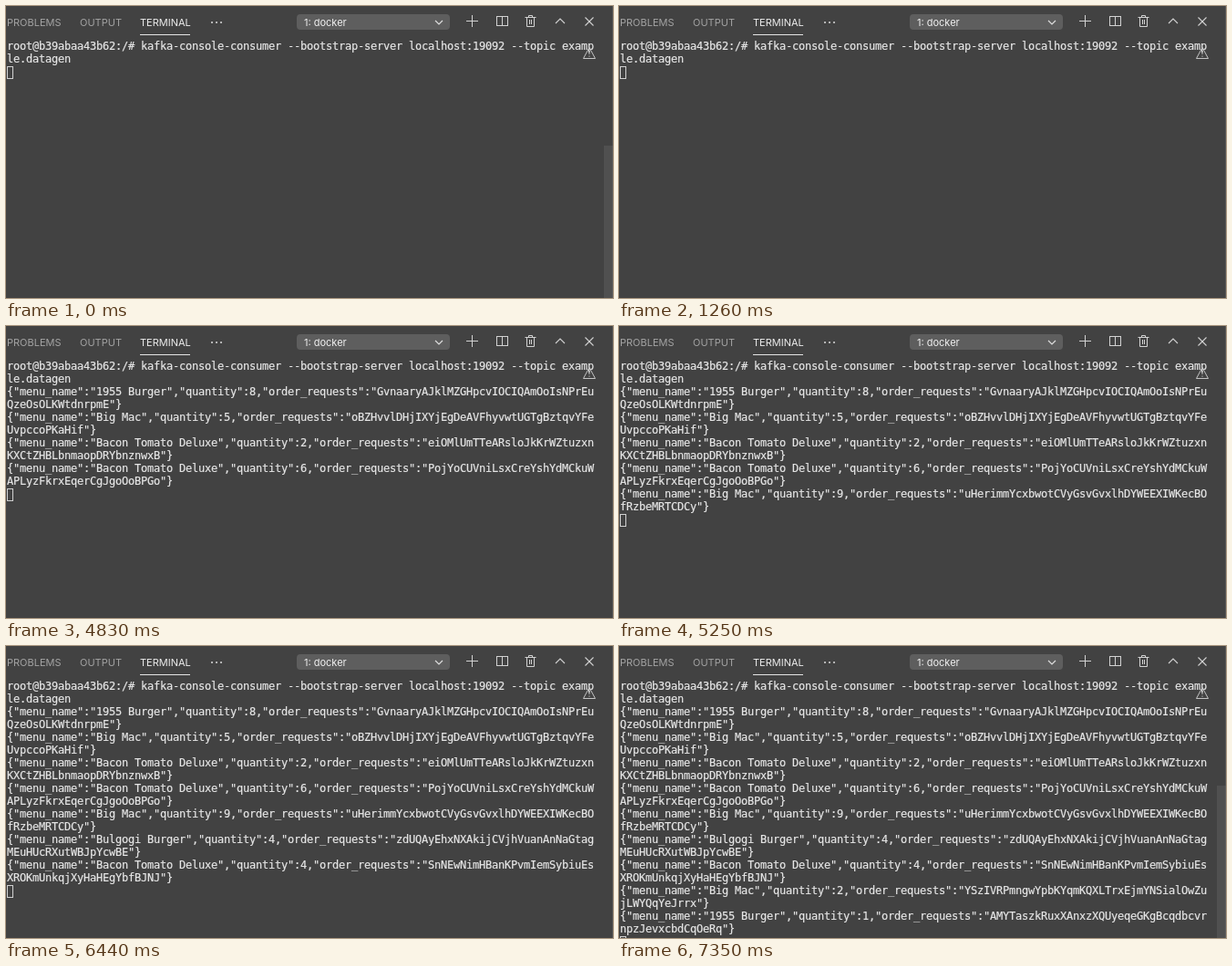
An HTML page with a canvas that plays this animation: 666x320 px, repeating every 7420 ms.

```html
<!DOCTYPE html>
<html lang="en">
<head>
<meta charset="utf-8">
<title>Terminal</title>
<style>
  html, body { margin: 0; width: 100%; height: 100%; overflow: hidden; background: #424242; }
  canvas { display: block; }
</style>
</head>
<body>
<canvas id="stage" width="666" height="320"></canvas>
<script>
const ctx = document.getElementById('stage').getContext('2d');
const W = 666, H = 320, LOOP = 7420;
const COLS = 92, CELL = 7, LINE = 14, LEFT = 1, TOP = 38;
const UI = '11px Inter, "Liberation Sans", sans-serif';
const MONO = '12px "DejaVu Sans Mono", monospace';

const command = 'root@b39abaa43b62:/# kafka-console-consumer ' +
  '--bootstrap-server localhost:19092 --topic example.datagen';

// arrival time, menu name, quantity, request id
const orders = [
  [4200, '1955 Burger', 8, 'GvnaaryAJklMZGHpcvIOCIQAmOoIsNPrEuQzeOsOLKWtdnrpmE'],
  [4200, 'Big Mac', 5, 'oBZHvvlDHjIXYjEgDeAVFhyvwtUGTgBztqvYFeUvpccoPKaHif'],
  [4410, 'Bacon Tomato Deluxe', 2, 'eiOMlUmTTeARsloJkKrWZtuzxnKXCtZHBLbnmaopDRYbnznwxB'],
  [4550, 'Bacon Tomato Deluxe', 6, 'PojYoCUVniLsxCreYshYdMCkuWAPLyzFkrxEqerCgJgoOoBPGo'],
  [5040, 'Big Mac', 9, 'uHerimmYcxbwotCVyGsvGvxlhDYWEEXIWKecBOfRzbeMRTCDCy'],
  [5740, 'Bulgogi Burger', 4, 'zdUQAyEhxNXAkijCVjhVuanAnNaGtagMEuHUcRXutWBJpYcwBE'],
  [6440, 'Bacon Tomato Deluxe', 4, 'SnNEwNimHBanKPvmIemSybiuEsXROKmUnkqjXyHaHEgYbfBJNJ'],
  [6860, 'Big Mac', 2, 'YSzIVRPmngwYpbKYqmKQXLTrxEjmYNSialOwZujLWYQqYeJrrx'],
  [7140, '1955 Burger', 1, 'AMYTaszkRuxXAnxzXQUyeqeGKgBcqdbcvrnpzJevxcbdCqOeRq']
];

const clamp = v => Math.max(0, Math.min(1, v));

function rect(x, y, w, h, color) {
  ctx.fillStyle = color;
  ctx.fillRect(x, y, w, h);
}

function label(text, x, color) {
  ctx.font = UI;
  ctx.fillStyle = color;
  ctx.fillText(text, x, 22);
}

function line(color, width, ...points) {
  ctx.strokeStyle = color;
  ctx.lineWidth = width;
  ctx.beginPath();
  for (let i = 0; i < points.length; i += 2) ctx.lineTo(points[i], points[i + 1]);
  ctx.stroke();
}

function box(x, y, w, h, color) {
  ctx.strokeStyle = color;
  ctx.lineWidth = 1;
  ctx.strokeRect(x, y, w, h);
}

function drawTabs() {
  label('PROBLEMS', 1, '#a3a3a3');
  label('OUTPUT', 81, '#a3a3a3');
  label('TERMINAL', 147, '#ececec');
  rect(147, 31, 55, 1, '#e4e4e4');
  for (const x of [225, 230, 235]) rect(x, 17, 2, 2, '#b4b4b4');
}

function drawPicker() {
  ctx.fillStyle = '#5e5e5e';
  ctx.beginPath();
  ctx.roundRect(319, 9, 168, 17, 4);
  ctx.fill();
  label('1: docker', 327, '#f0f0f0');
  line('#dedede', 1.2, 471, 16, 475, 20, 479, 16);
}

function drawIcons() {
  const c = '#d2d2d2';
  line(c, 1, 511.5, 10, 511.5, 23);
  line(c, 1, 505, 16.5, 518, 16.5);
  box(538.5, 11.5, 12, 10, c);
  line(c, 1, 544.5, 11, 544.5, 22);
  line(c, 1, 569.5, 12.5, 581.5, 12.5);
  line(c, 1, 573.5, 12, 573.5, 10.5, 577.5, 10.5, 577.5, 12);
  line(c, 1, 571.5, 13, 571.5, 22.5, 579.5, 22.5, 579.5, 13);
  line(c, 1, 574.5, 15, 574.5, 20);
  line(c, 1, 576.5, 15, 576.5, 20);
  line(c, 1.1, 603, 19, 608, 14, 613, 19);
  line(c, 1.1, 635.5, 12.5, 644.5, 21.5);
  line(c, 1.1, 644.5, 12.5, 635.5, 21.5);
}

function drawWarning() {
  line('#c4c4c4', 1, 640, 45.5, 646.5, 57.5, 633.5, 57.5, 640, 45.5);
  rect(639.5, 49, 1, 4, '#c4c4c4');
  rect(639.5, 54.5, 1, 1.2, '#c4c4c4');
}

// Writes on the character grid, wrapping at the last column; returns the next row.
function write(text, row) {
  ctx.font = MONO;
  ctx.fillStyle = '#e6e6e6';
  ctx.strokeStyle = '#e6e6e6';
  ctx.lineWidth = 0.2;
  [...text].forEach((ch, i) => {
    const x = LEFT + (i % COLS) * CELL;
    const y = TOP + 10 + (row + Math.floor(i / COLS)) * LINE;
    ctx.fillText(ch, x, y);
    ctx.strokeText(ch, x, y);
  });
  return row + Math.ceil(text.length / COLS);
}

function drawTerminal(t) {
  let row = write(command, 0);
  for (const [at, name, quantity, id] of orders) {
    if (t < at) break;
    row = write(`{"menu_name":"${name}","quantity":${quantity},"order_requests":"${id}"}`, row);
  }
  box(LEFT + 0.5, TOP + row * LINE + 0.5, 6, 13, '#d0d0d0');
}

function drawScrollbar(t) {
  const shown = t < 3000 ? 1 - clamp((t - 200) / 1000) : clamp((t - 7000) / 100);
  if (shown > 0) rect(656, 153, 10, 167, `rgba(121, 121, 121, ${0.25 * shown})`);
}

function draw(t) {
  rect(0, 0, W, H, '#424242');
  drawTabs();
  drawPicker();
  drawIcons();
  drawTerminal(t);
  drawWarning();
  rect(665, 0, 1, H, '#545454');
  drawScrollbar(t);
}

const start = performance.now();
function tick() {
  draw((performance.now() - start) % LOOP);
  requestAnimationFrame(tick);
}
tick();
</script>
</body>
</html>
```
